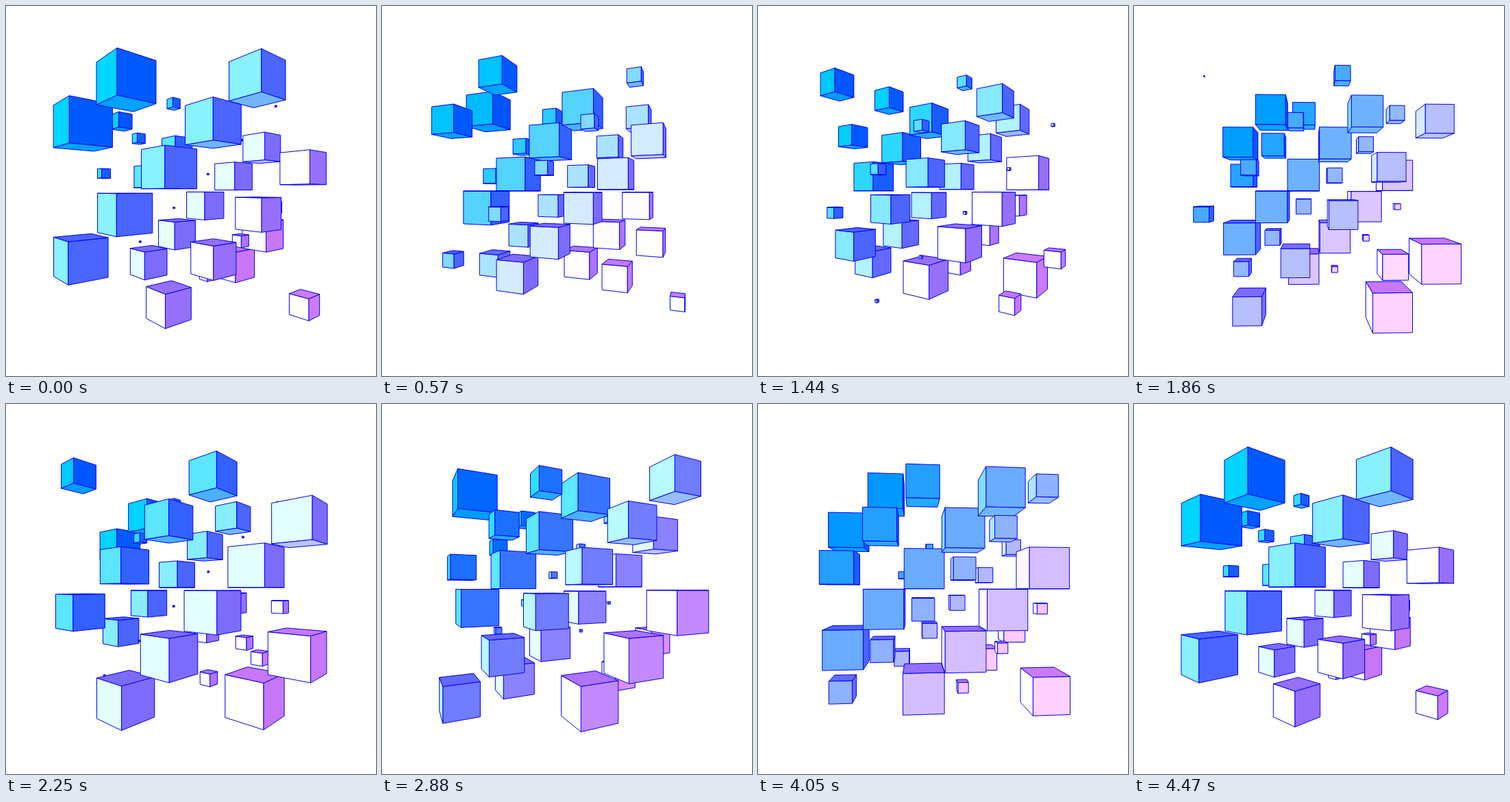
An HTML page with a canvas for the animation above (4.5 s loop, 540 px wide and 540 px high).

```html
<!DOCTYPE html>
<html>
<head>
<meta charset="utf-8">
<title>Cube wave</title>
<style>
html, body { margin: 0; width: 100%; height: 100%; overflow: hidden; background: #fff; }
canvas { display: block; }
</style>
</head>
<body>
<canvas id="stage" width="540" height="540"></canvas>
<script>
const ctx = document.getElementById('stage').getContext('2d');
const SIZE = 540, MID = SIZE / 2, STEPS = 150, STEP_MS = 30;
const FOCAL = MID / Math.tan(Math.PI / 6);
const GRID = 6, GAP = 50, MAX_EDGE = 50, DEPTH = 120;
const DEPTH_LAG = 122, EDGE_LAG = 66; // degrees per diagonal
const LIGHT = [-0.71, 0.5, 0.49];
const rad = deg => deg * Math.PI / 180;

function project([x, y, z]) {
  const k = FOCAL / (FOCAL - z);
  return [MID + x * k, MID + y * k];
}

// Ambient tone per diagonal plus one directional light.
function shade(diagonal, normal) {
  const lit = Math.max(0, normal.reduce((sum, v, i) => sum + v * LIGHT[i], 0));
  const red = Math.min(204, Math.max(0, 25 * (diagonal - 1))) * (1 + 0.98 * lit);
  const green = (86 + 3.7 * diagonal) * (1 + 1.63 * lit);
  const blue = (258 - diagonal) * (1 + lit);
  return `rgb(${[red, green, blue].map(v => Math.min(255, Math.round(v)))})`;
}

function drawFace(points, color) {
  ctx.beginPath();
  points.forEach(p => ctx.lineTo(...project(p)));
  ctx.closePath();
  ctx.fillStyle = color;
  ctx.fill();
  ctx.stroke();
}

function drawCube({ x, y, z, half, diagonal }, turn) {
  const sides = [0, 1, 2, 3].map(k => {
    const a = turn + k * Math.PI / 2;
    return [-Math.cos(a), 0, Math.sin(a)];
  });
  const corners = sides.map((n, k) => {
    const m = sides[(k + 1) % 4];
    return [x + half * (n[0] + m[0]), z + half * (n[2] + m[2])];
  });
  const at = (k, dy) => [corners[k][0], y + dy, corners[k][1]];

  sides.forEach((n, k) => {
    if (n[2] * (FOCAL - z) - n[0] * x <= half) return;
    const prev = (k + 3) % 4;
    drawFace([at(prev, -half), at(k, -half), at(k, half), at(prev, half)], shade(diagonal, n));
  });
  if (Math.abs(y) > half) {
    const dir = -Math.sign(y);
    drawFace([0, 1, 2, 3].map(k => at(k, dir * half)), shade(diagonal, [0, dir, 0]));
  }
}

function draw(step) {
  const theta = rad(step * 360 / STEPS);
  const turn = Math.PI / 4 - Math.PI / 2 * Math.sin(theta);
  const cubes = [];
  for (let i = 0; i < GRID; i++) {
    for (let j = 0; j < GRID; j++) {
      const offset = i + j - (GRID - 1);
      cubes.push({
        x: (i - (GRID - 1) / 2) * GAP,
        y: (j - (GRID - 1) / 2) * GAP,
        z: -DEPTH * Math.sin(theta + rad(DEPTH_LAG * offset)),
        half: MAX_EDGE / 2 * Math.abs(Math.sin(theta + rad(EDGE_LAG * offset))),
        diagonal: i + j
      });
    }
  }
  ctx.fillStyle = '#fff';
  ctx.fillRect(0, 0, SIZE, SIZE);
  ctx.strokeStyle = '#00f';
  ctx.lineWidth = 1;
  ctx.lineJoin = 'round';
  cubes.filter(c => c.half > 0.05)
    .sort((a, b) => a.z - b.z)
    .forEach(c => drawCube(c, turn));
}

const start = performance.now();
function tick() {
  const elapsed = performance.now() - start;
  draw(Math.floor(elapsed / STEP_MS) % STEPS + 1);
  requestAnimationFrame(tick);
}
tick();
</script>
</body>
</html>
```
